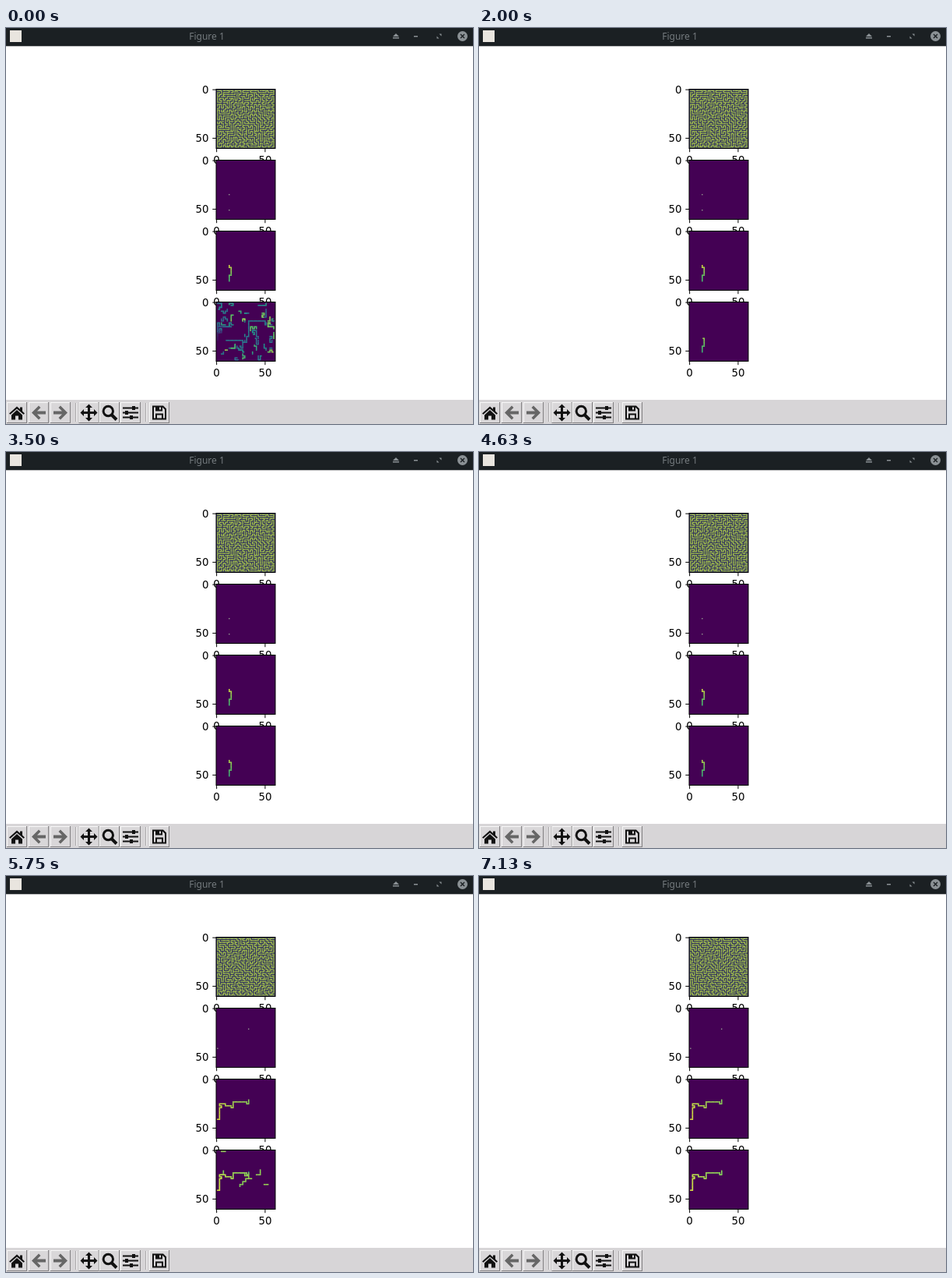
These frames come from a looping animation (600x508 px, 8000 ms). An HTML page with a canvas:

```html
<!DOCTYPE html>
<html lang="en">
<meta charset="utf-8">
<title>Figure 1</title>
<style>
  html, body { margin: 0; width: 100%; height: 100%; overflow: hidden; background: #fff }
  canvas { display: block }
</style>
<canvas id="stage" width="600" height="508"></canvas>
<script>
const g = document.getElementById('stage').getContext('2d');
const LOOP = 8000, STEP = 125, N = 61, LEFT = 270, TOP = 78.5, PITCH = 91, SIZE = 76, CELL = SIZE / N;
const DIRS = [[1, 0], [-1, 0], [0, 1], [0, -1]];

function random(seed) {
  return () => {
    seed = (seed + 0x6D2B79F5) | 0;
    let r = Math.imul(seed ^ seed >>> 15, 1 | seed);
    r = r + Math.imul(r ^ r >>> 7, 61 | r) ^ r;
    return ((r ^ r >>> 14) >>> 0) / 2 ** 32;
  };
}

const clamp = v => Math.max(0, Math.min(1, v));

const VIRIDIS = [[68, 1, 84], [59, 82, 139], [33, 145, 140], [94, 201, 98], [236, 226, 60]];
function viridis(v) {
  const p = Math.min(.9999, clamp(v)) * 4, i = Math.floor(p);
  return `rgb(${VIRIDIS[i].map((c, j) => Math.round(c + (VIRIDIS[i + 1][j] - c) * (p - i)))})`;
}

// Depth-first maze on the odd cells
function makeMaze(seed) {
  const rnd = random(seed), open = new Uint8Array(N * N), stack = [[1, 1]];
  open[N + 1] = 1;
  while (stack.length) {
    const [x, y] = stack[stack.length - 1];
    const ways = DIRS.filter(([dx, dy]) => {
      const a = x + 2 * dx, b = y + 2 * dy;
      return a > 0 && b > 0 && a < N && b < N && !open[b * N + a];
    });
    if (!ways.length) { stack.pop(); continue; }
    const [dx, dy] = ways[Math.floor(rnd() * ways.length)];
    open[(y + dy) * N + x + dx] = open[(y + 2 * dy) * N + x + 2 * dx] = 1;
    stack.push([x + 2 * dx, y + 2 * dy]);
  }
  return open;
}

// Short walks through the maze, each with a brightness and a lifetime
function makeWalks(maze, seed, count) {
  const rnd = random(seed);
  return Array.from({ length: count }, () => {
    let x = 1 + 2 * Math.floor(rnd() * 30), y = 1 + 2 * Math.floor(rnd() * 30), last = [0, 0];
    const cells = [[x, y]], size = 4 + rnd() * 14;
    while (cells.length < size) {
      const ways = DIRS.filter(([dx, dy]) =>
        maze[(y + dy) * N + x + dx] && !(dx == -last[0] && dy == -last[1]));
      if (!ways.length) break;
      last = ways[Math.floor(rnd() * ways.length)];
      cells.push([x += last[0], y += last[1]]);
    }
    return { cells, v: .32 + rnd() ** 2 * .6, life: rnd() };
  });
}

// Cells of a staircase through key points, each step across and then up or down
function stairs(...points) {
  let [x, y] = points[0];
  const cells = [[x, y]];
  for (const [px, py] of points.slice(1)) {
    const x0 = x, y0 = y, dx = px - x, dy = py - y;
    const steps = Math.max(1, Math.floor(Math.min(Math.abs(dx), Math.abs(dy)) / 3));
    for (let i = 1; i <= steps; i++) {
      const tx = Math.round(x0 + dx * i / steps), ty = Math.round(y0 + dy * i / steps);
      while (x != tx) cells.push([x += Math.sign(tx - x), y]);
      while (y != ty) cells.push([x, y += Math.sign(ty - y)]);
    }
  }
  return cells;
}

const mazes = [makeMaze(7), makeMaze(29)];
const walks = [makeWalks(mazes[0], 3, 46), makeWalks(mazes[1], 5, 46)];
const routes = [
  stairs([13, 51], [13, 45], [15, 37], [13, 35]),
  stairs([1, 41], [3, 29], [5, 27], [3, 25], [9, 27], [15, 29], [17, 23], [31, 25], [33, 21])
];
const loops = [
  stairs([15, 25], [5, 25], [1, 29], [5, 31], [1, 39]),
  stairs([10, 39], [27, 41], [31, 35], [33, 19], [50, 23])
];
const branches = [
  stairs([5, 25], [7, 13], [13, 15]),
  stairs([5, 1], [11, 5], [7, 9]),
  stairs([25, 23], [33, 29], [53, 29], [59, 51]),
  stairs([33, 29], [21, 41], [13, 51], [25, 59]),
  stairs([41, 25], [45, 17], [53, 13], [47, 9]),
  stairs([53, 35], [45, 43])
];

function cell(panel, x, y, color, scale = 1.25) {
  const s = CELL * scale, shift = (CELL - s) / 2;
  g.fillStyle = color;
  g.fillRect(LEFT + x * CELL + shift, TOP + PITCH * panel + y * CELL + shift, s, s);
}

function line(panel, cells, from, to, part = 1) {
  cells.slice(0, Math.round(cells.length * part))
    .forEach(([x, y], i) => cell(panel, x, y, viridis(from + (to - from) * i / cells.length)));
}

function axes(panel, content) {
  const top = TOP + PITCH * panel, bottom = top + SIZE;
  rects(viridis(0), [LEFT, top, SIZE, SIZE]);
  content();
  g.strokeStyle = '#000';
  g.lineWidth = 1;
  g.strokeRect(LEFT, top, SIZE, SIZE);
  g.font = '13.4px "DejaVu Sans", sans-serif';
  for (const n of [0, 50]) {
    const at = (n + .5) * CELL, x = LEFT + at, y = top + at;
    rects('#000', [x - .5, bottom, 1, 4.7], [LEFT - 4.7, y - .5, 4.7, 1]);
    g.textAlign = 'center';
    g.fillText(n, x, bottom + 19.2);
    g.textAlign = 'right';
    g.fillText(n, 260.6, y + 5);
  }
}

function drawMaze(maze) {
  rects('#2e2f5e', [LEFT, TOP, SIZE, SIZE]);
  maze.forEach((open, i) => { if (open) cell(0, i % N, Math.floor(i / N), '#b4d44a', 1); });
}

function drawWalks(list, age) {
  for (const w of list) if (w.life > age) line(3, w.cells, w.v, w.v + .1);
}

// First maze: noise fades, the loops retract, the short route remains
function searchFirst(k) {
  drawWalks(walks[0], k / 8);
  const left = clamp(2 - k / 8), v = Math.min(.95, .4 + k * .07);
  line(3, loops[0], v, v - .35, left);
  line(3, loops[1], v, v, left);
  line(3, routes[0], .62, .92, clamp((k - 11) / 6));
}

// Second maze: branches retract, the far end of the route dims and returns
function searchSecond(k) {
  drawWalks(walks[1], k / 3);
  branches.forEach((b, i) => line(3, b, .85, .7 + i % 3 * .08, clamp((10 - k) / 7)));
  line(3, routes[1].filter((c, i) => i % 2), .45, .4);
  line(3, routes[1], .98, .82, 1 - .2 * clamp(1 - Math.abs(k - 13) / 6));
}

function rects(color, ...list) {
  g.fillStyle = color;
  for (const r of list) g.fillRect(...r);
}

function shape(d, x, y, color, flip = 1) {
  g.save();
  g.translate(x, y);
  g.scale(flip, 1);
  g.fillStyle = color;
  g.fill(new Path2D(d), 'evenodd');
  g.restore();
}

function strokes(d, x, y, width, color) {
  g.save();
  g.translate(x, y);
  g.lineWidth = width;
  g.strokeStyle = color;
  g.stroke(new Path2D(d));
  g.restore();
}

function makeStipple() {
  const tile = document.createElement('canvas'), t = tile.getContext('2d');
  tile.width = tile.height = 2;
  t.fillStyle = '#aaa';
  t.fillRect(0, 0, 2, 2);
  t.fillStyle = '#222';
  t.fillRect(0, 0, 1, 1);
  t.fillRect(1, 1, 1, 1);
  return g.createPattern(tile, 'repeat');
}
const stipple = makeStipple();

function titleBar() {
  const bar = '#1b2023', gray = '#8b9195';
  rects(bar, [0, 0, 600, 23.3]);
  rects('#e9e5df', [5, 3, 15, 15]);
  g.fillStyle = '#747a7e';
  g.font = '12px "Noto Sans", sans-serif';
  g.textAlign = 'center';
  g.fillText('Figure 1', 258, 15);
  shape('M0-3L4 1H-4ZM-4 2H4V3.5H-4Z', 501, 10, gray);
  rects(gray, [524, 10, 5, 1.5]);
  shape('M0-3H3V0ZM-3 0L0 3H-3Z', 556.5, 10.5, gray);
  g.beginPath();
  g.arc(586.5, 10.5, 6.5, 0, 7);
  g.fillStyle = gray;
  g.fill();
  strokes('M-2.5-2.5L2.5 2.5M2.5-2.5L-2.5 2.5', 586.5, 10.5, 1.4, bar);
}

function toolBar() {
  const y = 493.5, black = '#111';
  rects('#d7d5d7', [0, 477, 600, 31]);
  for (const x of [14, 42, 70, 106.5, 133, 160, 197]) {
    rects('#828082', [x - 13, 480, 26, 27]);
    rects('#f8f8f8', [x - 13, 480, 25, 26]);
    rects('#d9d7d9', [x - 12, 481, 24, 25]);
  }
  for (const x of [89, 179]) {
    rects('#aaa8aa', [x, 481, 1, 24]);
    rects('#f4f4f4', [x + 1, 481, 1, 24]);
  }
  shape('M-10 1L0-8 4-4.5V-7H7V-2L10 1 8.5 2.3 0-5-8.5 2.3Z', 14, y, black);
  shape('M-7 3L0-3.5 7 3V9H2V4H-2V9H-7Z', 14, y, black);
  const arrow = 'M-9 0L0-9 2.5-6.5-2-2H9V2H-2L2.5 6.5 0 9Z';
  shape(arrow, 42, y, stipple);
  shape(arrow, 70, y, stipple, -1);
  const head = 'M0-11L4.5-6.5H1.5V0H-1.5V-6.5H-4.5Z';
  for (let i = 0; i < 4; i++) {
    g.save();
    g.translate(106.5, y);
    g.rotate(i * Math.PI / 2);
    shape(head, 0, 0, black);
    g.restore();
  }
  rects(black, [105, y - 1.5, 3, 3]);
  strokes('M4.5-2A6.2 6.2 0 1 1-7.9-2A6.2 6.2 0 1 1 4.5-2', 133, y, 3, black);
  strokes('M2.5 2.5L9 9', 133, y, 4, black);
  strokes('M-10-6H10M-10 0H10M-10 6H10', 160, y, 2, black);
  rects(black, [162, 485, 4, 5], [153, 491, 4, 5], [159, 497, 4, 5]);
  shape('M-9-9H5L9-5V9H-9ZM-7-7V7H-5V1H5V7H7V-4L4-7V-2H-5V-7ZM-3 3V7H3V3ZM0-7V-4H2V-7Z', 197, y, black);
}

function draw(k) {
  const id = k < 38 ? 0 : 1, route = routes[id];
  rects('#fff', [0, 0, 600, 508]);
  axes(0, () => drawMaze(mazes[id]));
  axes(1, () => [route[0], route[route.length - 1]].forEach(([x, y]) => cell(1, x, y, '#a9bfa0', 1)));
  axes(2, () => line(2, route, id ? .97 : .66, id ? .82 : .97));
  axes(3, () => id ? searchSecond(k - 38) : searchFirst(k));
  titleBar();
  toolBar();
}

let shown = -1;
function tick() {
  const k = Math.floor(performance.now() % LOOP / STEP);
  if (k != shown) draw(shown = k);
  requestAnimationFrame(tick);
}
tick();
</script>
</html>
```
